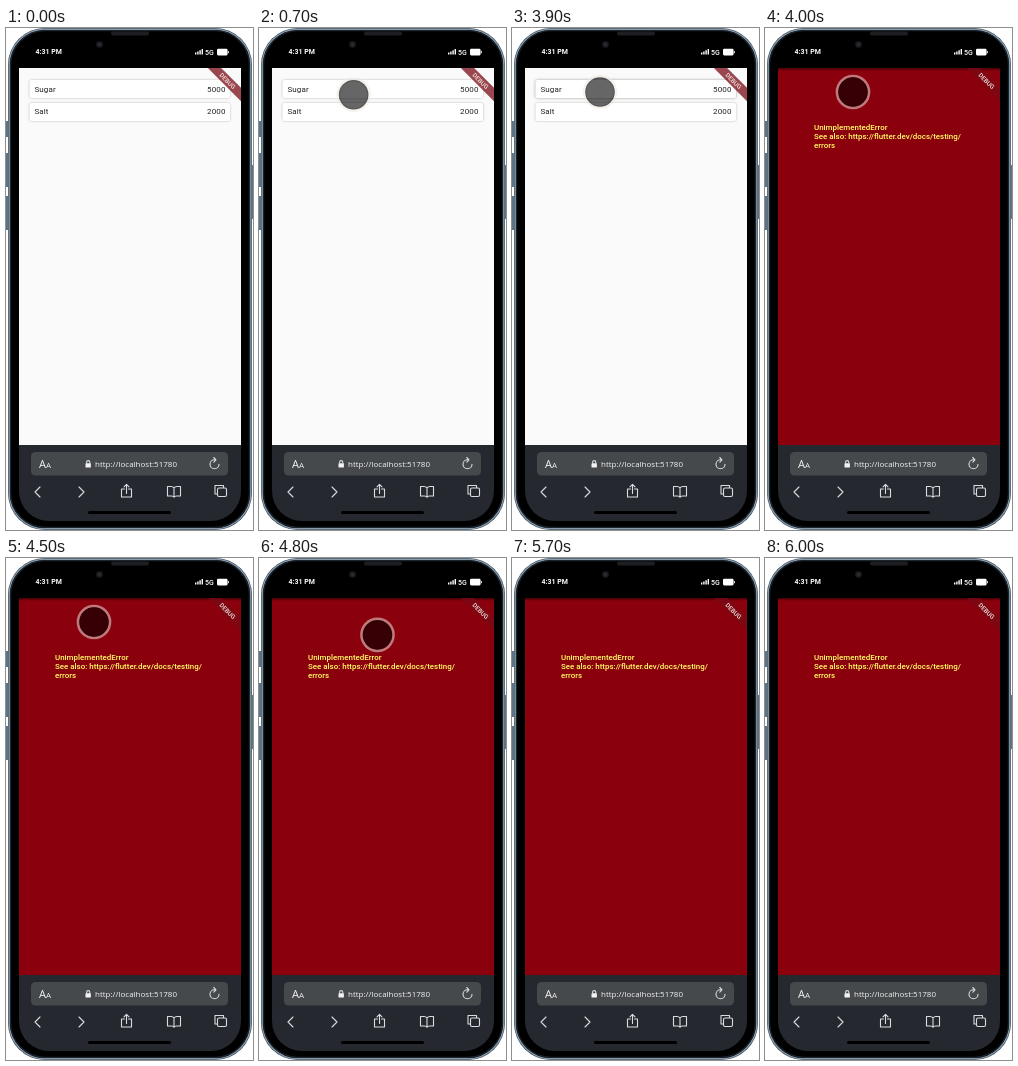
These frames come from a looping animation (247x502 px, 6.1 s). An HTML page:

```html
<!DOCTYPE html>
<html lang="en">
<head>
<meta charset="utf-8">
<title>Phone list drag error</title>
<style>
html, body { margin: 0; width: 100%; height: 100%; overflow: hidden; background: #fff }
svg { display: block; width: 247px; height: 502px; font-family: Roboto, sans-serif }
.line { fill: none; stroke: #d9dce0; stroke-width: 1.1; stroke-linecap: round; stroke-linejoin: round }
.list { font-size: 8px; letter-spacing: .1px; fill: #222 }
.card { fill: #fff; filter: drop-shadow(0 .4px .8px #0004) }
.error { font-size: 7.95px; font-weight: 500; fill: #ff6 }
</style>
</head>
<body>
<svg viewBox="0 0 247 502">
  <defs>
    <clipPath id="page"><path d="M13 40H235V417H13Z"/></clipPath>
    <linearGradient id="shade" x2="0" y2="1">
      <stop stop-opacity=".5"/>
      <stop offset="1" stop-opacity="0"/>
    </linearGradient>
  </defs>

  <!-- Phone body -->
  <path d="M0 93h3v16H0zM0 125h3v34H0zM0 168h3v34H0zM244 137h3v54h-3z" fill="#5d7386"/>
  <rect x="2" y="0" width="244" height="502" rx="37" fill="#34444f"/>
  <rect x="3.2" y="1.2" width="241.6" height="499.6" rx="36" fill="#000" stroke="#8799aa" stroke-width="1.4"/>
  <rect x="4.6" y="2.6" width="238.8" height="496.8" rx="34.6" fill="#000" stroke="#1b252d" stroke-width="1.2"/>
  <rect x="105" y="3.5" width="38" height="4" rx="2" fill="#1d1e21"/>
  <circle cx="93.5" cy="16.5" r="3.3" fill="#1c1d20"/>
  <circle cx="93.5" cy="16.5" r="1.2" fill="#30343c"/>

  <!-- Status bar -->
  <g fill="#fff" font-size="7">
    <text x="29.5" y="25.5" font-weight="700">4:31 PM</text>
    <path d="M189 24.5h1.4v2H189zM191.2 23.4h1.4v3.1h-1.4zM193.4 22.2h1.4v4.3h-1.4zM195.6 21h1.4v5.5h-1.4z"/>
    <text x="199" y="26.8" font-weight="500">5G</text>
    <rect x="211" y="20.8" width="10.6" height="6.6" rx="1.3"/>
    <path d="M222 23v2.2h.8v-2.2z"/>
  </g>

  <!-- Page -->
  <g clip-path="url(#page)">
    <path d="M13 40H235V417H13Z" fill="#fafafa"/>
    <g class="list">
      <rect class="card" x="23.5" y="75" width="200.5" height="18" rx="2"/>
      <rect class="card" id="lifted" x="23.5" y="52" width="200.5" height="18" rx="2"/>
      <text x="28.5" y="63.5">Sugar</text><text x="219.5" y="63.5" text-anchor="end">5000</text>
      <text x="28.5" y="86.3">Salt</text><text x="219.5" y="86.3" text-anchor="end">2000</text>
    </g>
    <g id="crash" class="error">
      <path d="M13 40H235V417H13Z" fill="#8b000d"/>
      <path d="M13 40H235v3H13Z" fill="url(#shade)"/>
      <text x="49" y="102">UnimplementedError</text>
      <text x="49" y="111">See also: https://flutter.dev/docs/testing/</text>
      <text x="49" y="120">errors</text>
    </g>
    <g transform="translate(221.5 53) rotate(45)">
      <rect x="-40" y="-4.7" width="80" height="9.4" fill="#780a16" fill-opacity=".75"/>
      <text y="2.2" font-size="6.2" font-weight="500" fill="#f4e6de" text-anchor="middle">DEBUG</text>
    </g>
    <g id="touch">
      <circle r="16" fill="none" stroke="#eee8e0" stroke-width="2.7" stroke-opacity=".52"/>
      <circle r="14.8" fill="#000" fill-opacity=".6"/>
      <circle r="14.2" fill="none" stroke="#000" stroke-opacity=".16"/>
    </g>
  </g>

  <!-- Browser toolbar -->
  <path d="M13 417H235V463a30 30 0 0 1-30 30H43a30 30 0 0 1-30-30Z" fill="#25282f"/>
  <rect x="25" y="424" width="197" height="23.5" rx="4.5" fill="#46494c"/>
  <g fill="#f2f2f3" font-family="Open Sans, sans-serif" font-weight="500">
    <text x="33" y="440" font-size="11">A<tspan font-size="8">A</tspan></text>
    <text x="89" y="439" font-size="8">http://localhost:51780</text>
    <rect x="79.5" y="435.3" width="5.4" height="4.2" rx=".6"/>
  </g>
  <g class="line">
    <path d="M80.6 435.5v-1.3a1.6 1.6 0 0 1 3.2 0v1.3"/>
    <path d="M209.5 431.8h-1a4.5 4.5 0 1 0 4.500 4.500M207.800 429.500l2.200 2.300-2.200 2.300"/>
    <path d="M34 459l-5 5 5 5M73 459l5 5-5 5"/>
    <path d="M118.5 461H115.5V469H125.5V461H122.5M120.5 465.5V456.5M118 458.8l2.5-2.5 2.5 2.5"/>
    <path d="M168 460q-1-1.5-3-1.500h-3.500v9.500h4q2 0 2.500 1.300.5-1.300 2.500-1.300h4v-9.500h-3.500q-2 0-3 1.500v9.300"/>
    <path d="M211 466h-2v-8.5h8.5v2"/>
    <rect x="211.5" y="460" width="9" height="8.5" rx="1.5"/>
  </g>
  <rect x="82" y="483" width="83" height="3" rx="1.5" fill="#000"/>
</svg>
<script>
const LOOP = 6100, STEP = 100;
const [touch, lifted, crash] = ['touch', 'lifted', 'crash'].map(id => document.getElementById(id));
const progress = (t, from, to) => Math.min(1, Math.max(0, (t - from) / (to - from)));

function draw(t) {
  // The pointer glides in, holds the first row, then leaves after the error.
  const enter = 1 - (1 - progress(t, 300, 800)) ** 2;
  const leave = progress(t, 4500, 5200) ** 2;
  const away = 1 - enter + leave;
  touch.setAttribute('transform', `translate(${88 + 166 * away} ${64 + 70 * away})`);
  touch.style.display = t < 400 || t >= 5200 ? 'none' : '';

  const lift = progress(t, 1300, 1900);
  lifted.style.filter = `drop-shadow(0 ${.4 + .4 * lift}px ${.8 + .8 * lift}px rgba(0,0,0,${.27 + .1 * lift}))`;
  crash.style.display = t < 4000 ? 'none' : '';
}

function tick() {
  draw(Math.floor(performance.now() % LOOP / STEP) * STEP);
  requestAnimationFrame(tick);
}
tick();
</script>
</body>
</html>
```
